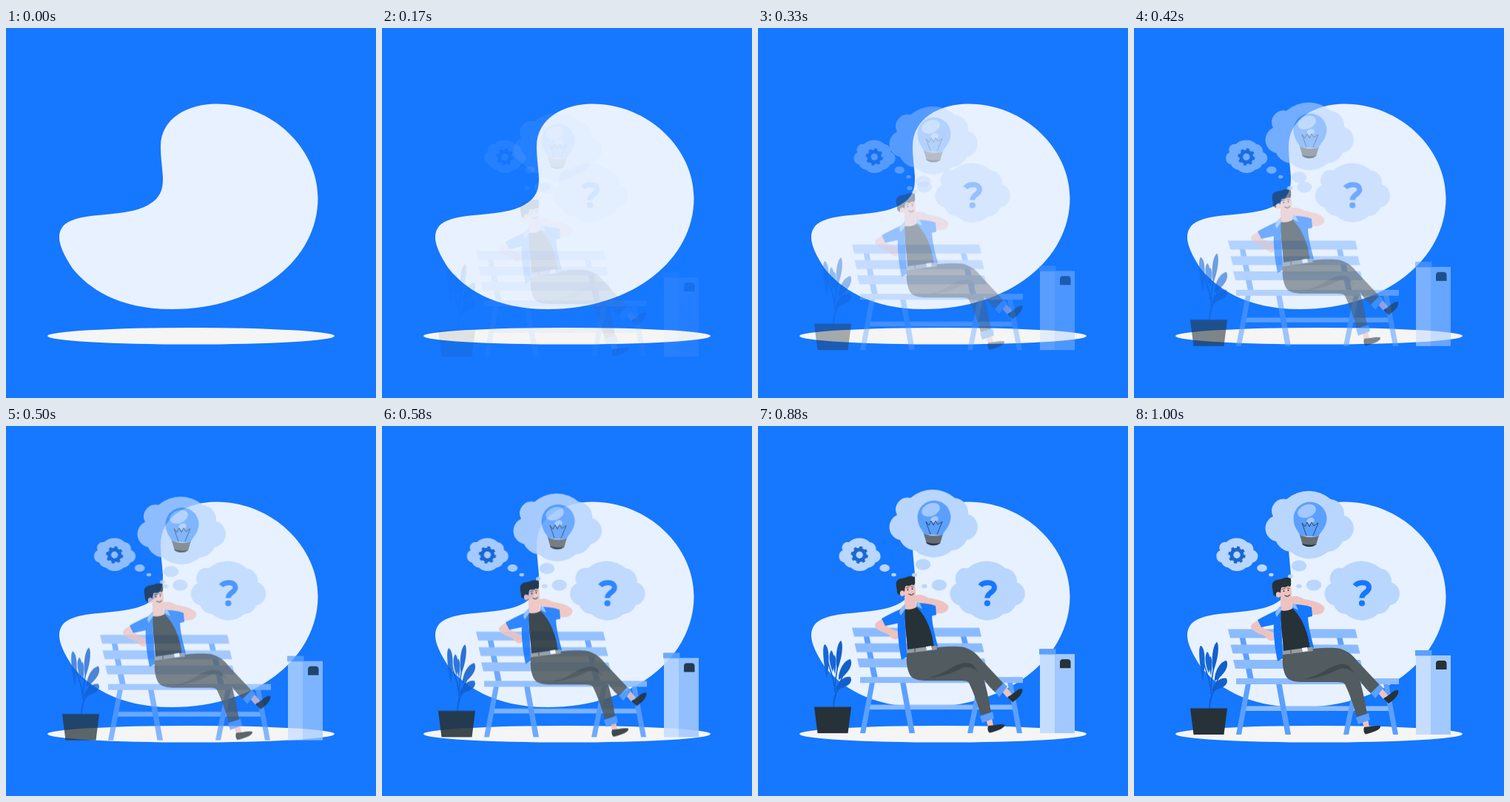
An HTML page for the animation above (1.04 s loop, 500x500 px).

```html
<!DOCTYPE html>
<html lang="en">
<head>
<meta charset="utf-8">
<title>Thinking on a bench</title>
<style>
  :root {
    --blue: #1677ff;
    --dark: #263238;
    --skin: #eec3bf;
    --mid: #5ca0ff;
    --soft: #8bbbff;
    --pale: #b9d6ff;
    --delay: 0ms;
  }
  html, body { margin: 0; width: 100%; height: 100%; overflow: hidden; background: var(--blue); }
  svg { display: block; width: 100vw; height: 100vh; }

  /* Paused: the script scrubs every part through --delay. */
  .in { animation: slide 1s cubic-bezier(.36, -.01, .5, 1.38) var(--delay) both paused; --x: 0px; --y: 0px; }
  .up { --y: 30px; }
  .from-right { --x: 30px; }
  .from-left { --x: -30px; }
  @keyframes slide {
    from { opacity: 0; transform: translate(var(--x), var(--y)); }
    to { opacity: 1; transform: none; }
  }

  .blue { fill: var(--blue); }
  .dark { fill: var(--dark); }
  .skin { fill: var(--skin); }
  .mid { fill: var(--mid); }
  .soft { fill: var(--soft); }
  .pale { fill: var(--pale); }
  .cloth { fill: #515b60; }
  .fold { fill: #40494d; }
  .leaf { fill: #125fcc; }
  .line { fill: none; stroke: var(--dark); stroke-width: .8; stroke-linejoin: round; stroke-linecap: round; }
  .gear { fill: none; stroke: #1a67d2; }
  .mark { fill: none; stroke: var(--blue); stroke-width: 7; }
  .stem { fill: none; stroke: #125fcc; stroke-width: 1.6; }
</style>
</head>
<body>
<svg viewBox="0 0 500 500">
  <defs>
    <path id="cloud" d="M206 99A46 46 0 0 1 266 99A20 20 0 0 1 284 121A18 18 0 0 1 282 156A24 24 0 0 1 262 170A38 38 0 0 1 212 170A24 24 0 0 1 192 156A18 18 0 0 1 188 122A16 16 0 0 1 206 99Z"/>
  </defs>

  <path fill="#e8f1ff" d="M72 283C72 262 92 256 125 253C168 249 187 246 203 231C212 221 212 211 212 201C211 186 209 175 209 160C209 122 246 102.500 284 102.500C360 102.500 421.500 163 421.500 230C421.500 312 340 380 224 380C150 380 110 350 90 325C78 307 72 293 72 283Z"/>
  <ellipse fill="#f5f5f5" cx="250" cy="416.300" rx="194" ry="11.300"/>

  <g id="bin" class="in up">
    <path fill="#c5ddff" d="M381 310H401V417H381Z"/>
    <path fill="#a2c9ff" d="M401 310H428V417H401Z"/>
    <path class="mid" d="M380 303H402.500V310.500H380Z"/>
    <path class="dark" d="M408 329V321Q408 317 412 317H418.500Q422.500 317 422.500 321V329Z"/>
  </g>

  <g id="plant" class="in up">
    <path class="stem" d="M102 382C102 362 109 356 118 349M102 380C104 362 112 345 119 330M104 362C103 346 108 330 110 308M103 354C103 340 95 330 92 308"/>
    <path class="leaf" d="M112 292C115 294 115 312 107 332C104 318 106 296 112 292Z"/>
    <path class="leaf" d="M125 317C129 325 122 336 109 345C108 333 116 318 125 317Z"/>
    <path class="leaf" d="M125 341C129 350 119 355 105 358C107 347 117 339 125 341Z"/>
    <g fill="#1467d8">
      <path d="M90 297C95 298 98 314 93 344C89 326 86 300 90 297Z"/>
      <path d="M99 305C103 308 104 321 101 334C96 323 95 309 99 305Z"/>
      <path d="M103 311C106 313 106 325 104 337C101 327 100 315 103 311Z"/>
    </g>
    <path class="dark" d="M76 381.500H126L121.500 417H80.500Z"/>
  </g>

  <g id="bench" class="in up">
    <path class="mid" d="M142 282H149.500L162 343H154ZM273 282H280.500L295 343H287Z"/>
    <path class="soft" d="M127 274.500H299L302 286.500H130ZM130.500 295.500H302.500L305.500 307.500H133.500ZM134 316H306L309 328H137Z"/>
    <path class="soft" d="M148 378.500H346V385H148Z"/>
    <path class="mid" d="M151 348H158L145 417H138ZM192 348H199.500L212 417H204.500ZM297 348H304L290 417H283ZM337 348H344L357 417H350Z"/>
    <path class="soft" d="M138 341H358V349H138Z"/>
  </g>

  <g id="man" class="in up">
    <path class="skin" d="M171 261C164 264 157 268 158 272C160 278 171 281 177 284C180 289 185 292 189 289L190 280C184 277 178 276 172 270L178 265Z"/>
    <path class="skin" d="M211 232C217 228 223 230 230 234C243 236 256 240 257.500 246C257 254 249 256 239 255L238 244C228 244 219 241 211 239Z"/>
    <path class="skin" d="M198 232L211 234L215 247C212 252 201 252 198 249Z"/>
    <path class="skin" d="M196 217C203 211 212 213 212.500 219C213 224 214 230 212 234C209 239 201 237 198 231Z"/>
    <path class="dark" d="M188 227C188 221 185 215 188 211C191 207 197 208 201 206C206 204 210 206 212 205C211 207 213 208 212 211C213 215 211 219 208 216C204 220 201 216 199 219C198 222 199 225 196 229C194 231 190 231 188 227Z"/>
    <ellipse class="skin" cx="195" cy="228" rx="3.200" ry="3.700"/>
    <circle class="dark" cx="202.500" cy="223" r=".9"/>
    <circle class="dark" cx="208.500" cy="222" r=".9"/>
    <path class="line" d="M200.500 220.500L204 219.500M207 219L210 219.500"/>
    <path fill="#fff" stroke="#263238" stroke-width=".7" d="M203.500 229Q207.500 231.500 210.500 228Q209 232.500 203.500 229Z"/>

    <path class="blue" d="M194 249C185 252 174 258 167 262L172 272L191 268Z"/>
    <path class="blue" d="M214 241C224 241 233 242 240 245L241 257L233 259Z"/>
    <path class="dark" d="M198 249C203 251 211 249 215 246C227 254 234 274 239 301L202 306C201 283 197 266 198 249Z"/>
    <path class="blue" d="M192 249L199 247C197 263 201 287 201 314L194 318C190 298 188 280 189 266Z"/>
    <path class="blue" d="M214 243L222 242L235 258C236 275 240 287 243 299L238 303C236 280 228 260 214 246Z"/>
    <path class="soft" d="M191 254C192 249 195 245 199 243L199 249L193 258Z"/>
    <path class="soft" d="M214 239L219 242L222 249L214 245Z"/>

    <path class="skin" d="M308 398L316 396L318 407L311 408ZM330 361L336 355L343 364L337 369Z"/>
    <path class="cloth" d="M203 329C204 342 211 345 225 346H270C279 346 283 346 285 349C291 361 297 378 301 393L315 389C311 365 306 340 297 325L260 312Z"/>
    <path class="fold" d="M230 342C248 337 265 321 283 321L299 327L301 337C293 329 286 326 278 328C264 335 249 341 230 342Z"/>
    <path class="cloth" d="M201 307L241 301C256 300 268 299 279 301C292 305 298 313 303 319L333 351L322 363C310 353 301 338 290 324C276 316 260 331 246 337C235 341 222 345 211 343C201 338 200 320 201 307Z"/>
    <path fill="#969da0" d="M201 304L241 298.500L242 304L201 309Z"/>
    <path fill="#fff" d="M227 300L234 299L235 304L228 305Z"/>
    <path class="line" d="M212 303V307"/>
    <path class="mid" d="M320 361L332 349L337 354L326 368ZM300 394L317 388L319 397L303 403Z"/>
    <path class="dark" d="M337 368C345 365 350 356 357 357C359 362 352 370 344 375Z"/>
    <path class="dark" d="M311 407C319 407 326 404 333 405.500C334 410 324 414 313 416.500C310 414 310 410 311 407Z"/>
  </g>

  <g id="idea" class="in up">
    <use href="#cloud" class="pale"/>
    <ellipse class="pale" cx="223" cy="189" rx="10.300" ry="7.600"/>
    <ellipse class="pale" cx="211.500" cy="203" rx="3.600" ry="2.600"/>
    <path class="mid" d="M224 148C224 144 215.500 138 215.500 125A22.500 22.500 0 0 1 260.500 125C260.500 138 250 144 249.500 150Z"/>
    <ellipse fill="#a2c9ff" cx="233.500" cy="115" rx="12.800" ry="8.500" transform="rotate(-22 233.500 115)"/>
    <ellipse fill="#a2c9ff" cx="238.500" cy="128" rx="5.500" ry="4" transform="rotate(-22 238.500 128)"/>
    <path class="line" d="M233 148L227 131L231 136L234 130L237 136L240 130L243 135L249 131L242 148"/>
    <path fill="#666e72" d="M224 147.500Q237 152 249.500 149L246 161H228Z"/>
    <path class="dark" d="M227 159Q237 162 246 160C243 164 231 165 227 159Z"/>
  </g>

  <g id="work" class="in from-right">
    <use href="#cloud" class="pale" transform="translate(139.300 173.700) scale(.47 .485) translate(-237 -133.500)"/>
    <ellipse class="pale" cx="173" cy="192" rx="6.800" ry="5"/>
    <ellipse class="pale" cx="185.300" cy="201" rx="3.200" ry="2.300"/>
    <circle class="gear" cx="139" cy="174.200" r="7.200" stroke-width="5"/>
    <circle class="gear" cx="139" cy="174.200" r="10" stroke-width="3.200" pathLength="16" stroke-dasharray="1"/>
  </g>

  <g id="doubt" class="in from-left">
    <use href="#cloud" class="pale" transform="translate(308 222.500) scale(.85 .875) translate(-237 -133.500)"/>
    <ellipse class="pale" cx="243" cy="215" rx="10.200" ry="7.400"/>
    <ellipse class="pale" cx="223" cy="216.500" rx="3.700" ry="2.700"/>
    <path class="mark" d="M298.500 216C302 211 317.500 209 317.500 218.500C317.500 225 308 225 308 232.500"/>
    <circle class="blue" cx="308" cy="239.500" r="4.100"/>
  </g>
</svg>
<script>
  const LOOP = 1040, STEP = 1000 / 24;
  const root = document.documentElement;

  // The motion runs at 24 pictures a second, switching on 10 ms ticks.
  function draw() {
    const time = performance.now() % LOOP;
    const step = Math.floor((time + 5) / STEP);
    root.style.setProperty('--delay', -step * STEP + 'ms');
    requestAnimationFrame(draw);
  }
  draw();
</script>
</body>
</html>
```
